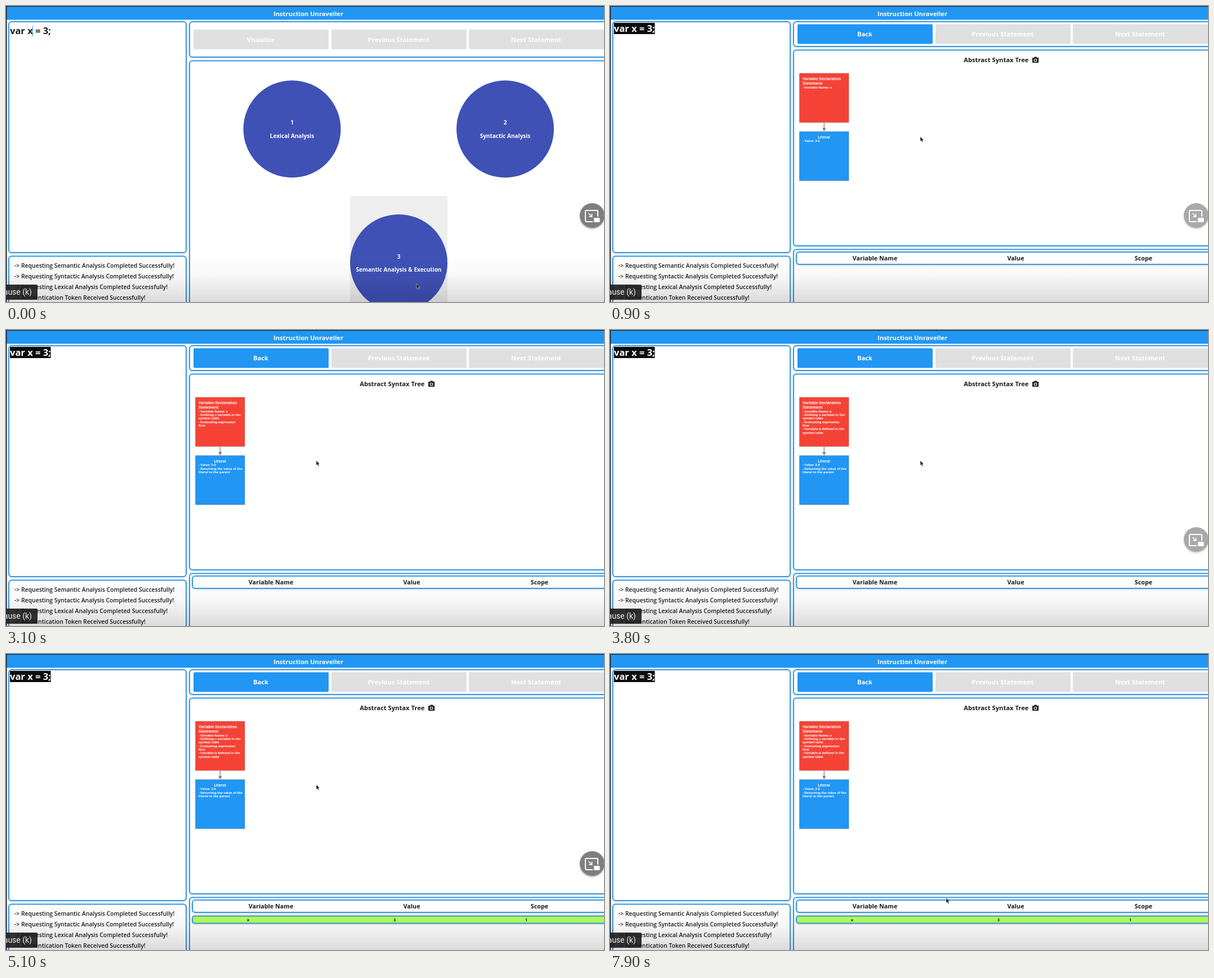
An HTML page that plays this animation: 1062 by 527 pixels, repeating every 8 s.

```html
<!DOCTYPE html>
<html lang="en">
<head>
<meta charset="utf-8">
<title>Instruction Unraveller</title>
<style>
  html, body { margin: 0; width: 100%; height: 100%; overflow: hidden; background: #fff; }
  svg { display: block; width: 100%; height: 100%; font-family: "Open Sans", "Noto Sans", sans-serif; }
  text { white-space: pre; }
  .b { font-weight: 700; }
  .s { font-weight: 600; }
</style>
</head>
<body>
<svg id="stage" viewBox="0 0 1062 527">
  <defs>
    <linearGradient id="dim" x1="0" y1="0" x2="0" y2="1">
      <stop offset="0" stop-color="#000" stop-opacity="0"/>
      <stop offset=".45" stop-color="#000" stop-opacity=".025"/>
      <stop offset="1" stop-color="#000" stop-opacity=".14"/>
    </linearGradient>
    <filter id="soft" x="-30%" y="-30%" width="160%" height="160%">
      <feGaussianBlur stdDeviation="1.6"/>
    </filter>
  </defs>
</svg>
<script>
const LOOP = 8000, STEP = 100;
const BLUE = '#2196f3', EDGE = '#3298e4', INK = '#1c1c1c';
const stage = document.getElementById('stage');

function el(parent, tag, attrs, content) {
  const node = document.createElementNS('http://www.w3.org/2000/svg', tag);
  for (const k in attrs) node.setAttribute(k, attrs[k]);
  if (content !== undefined) node.textContent = content;
  parent.appendChild(node);
  return node;
}
const group = (parent = stage) => el(parent, 'g', {});
const rect = (p, x, y, w, h, fill, more) => el(p, 'rect', { x, y, width: w, height: h, fill, ...more });
const path = (p, d, more) => el(p, 'path', { d, ...more });
const label = (p, x, y, str, size, fill = INK, anchor = 'middle', cls = 'b') =>
  el(p, 'text', { x, y, 'font-size': size, fill, 'text-anchor': anchor, class: cls }, str);

function panel(p, x, y, x2, y2, fill = '#fff', rx = 5) {
  const box = { rx, 'stroke-width': 2 };
  rect(p, x, y + 1, x2 - x, y2 - y, 'none', { ...box, stroke: '#000', opacity: .18, filter: 'url(#soft)' });
  rect(p, x, y, x2 - x, y2 - y, fill, { ...box, stroke: EDGE });
}

function toolbar(p, y, first, fill) {
  [[333, first], [578, 'Previous Statement'], [822, 'Next Statement']].forEach(([x, str], i) => {
    rect(p, x, y, 240, 35, i ? '#e0e0e0' : fill, { rx: 2 });
    label(p, x + 119.5, y + 21.5, str, 11.2, '#fff');
  });
}

function notes(p, y, lines) {
  lines.forEach((str, i) => label(p, 342, y + i * 6.35, str, 5.7, '#fff', 'start'));
}

// Shared frame
rect(stage, 0, 0, 1062, 527, '#fff');
rect(stage, 0, 0, 1062, 24.5, BLUE);
rect(stage, 0, 0, 1062, 1.2, '#15263a');
rect(stage, 0, 0, 1.5, 527, '#20262c');
label(stage, 537, 17.5, 'Instruction Unraveller', 11.2, '#fff');
panel(stage, 5, 28, 320, 439);
panel(stage, 5, 445.5, 320, 540);
['Requesting Semantic Analysis Completed', 'Requesting Syntactic Analysis Completed',
 'Requesting Lexical Analysis Completed', 'Authentication Token Received']
  .forEach((str, i) => label(stage, 15, 466 + i * 19, `-> ${str} Successfully!`, 10.4, INK, 'start', 's'));

// Menu view
const menu = group();
label(menu, 7, 50, 'var x = 3;', 16.5, INK, 'start');
rect(menu, 47, 35, 1, 19, '#3298e4');
panel(menu, 326, 28, 1075, 91);
toolbar(menu, 42, 'Visualize', '#e0e0e0');
panel(menu, 326, 97.5, 1075, 540);
rect(menu, 611, 338, 173, 189, '#eee');
[[508, 219, 'Lexical Analysis'], [886.5, 219, 'Syntactic Analysis'], [697.5, 457.5, 'Semantic Analysis & Execution']]
  .forEach(([cx, cy, str], i) => {
    el(menu, 'circle', { cx, cy, r: 86.5, fill: '#3f51b5' });
    label(menu, cx, cy - 8, i + 1, 10, '#fff');
    label(menu, cx, cy + 15.5, str, 10, '#fff');
  });

// Tree view
const tree = group();
rect(tree, 7, 30, 72.5, 20, '#0c0c0c');
label(tree, 7, 46, 'var x = 3;', 16.5, '#fff', 'start');
panel(tree, 326, 28, 1075, 72);
toolbar(tree, 32.5, 'Back', BLUE);
panel(tree, 326, 78.5, 1075, 427);
label(tree, 685.8, 100, 'Abstract Syntax Tree', 11.2);
path(tree, 'M750 93q0-1 1-1h2l1-1.5h3.5l1 1.5h1.7q1 0 1 1v7q0 1-1 1h-9.2q-1 0-1-1z', { fill: INK });
el(tree, 'circle', { cx: 755.6, cy: 96.5, r: 2.3, fill: INK, stroke: '#fff', 'stroke-width': 1.1 });

const card = { stroke: '#777', 'stroke-width': .7, 'stroke-opacity': .5 };
rect(tree, 336.3, 119.8, 87.8, 87.6, '#f44336', card);
rect(tree, 336.3, 223.5, 87.8, 87.6, BLUE, card);
path(tree, 'M380.3 208v13', { stroke: '#888', 'stroke-width': 1.4 });
path(tree, 'M376.8 216.5l3.5 6.5 3.5-6.5-3.5 1.6z', { fill: '#777' });
label(tree, 342, 131.5, 'Variable Declaration', 6.7, '#fff', 'start');
label(tree, 342, 139.7, 'Statement', 6.7, '#fff', 'start');
label(tree, 380, 235.5, 'Literal', 6.7, '#fff');
notes(tree, 146.6, ['- Variable Name: x']);
notes(tree, 242.4, ['- Value: 3.0']);

// Notes that turn up one after another
const steps = [
  [1000, 152.95, ['- Defining a variable in the', 'symbol table']],
  [2000, 165.65, ['- Evaluating expression', 'first']],
  [3100, 248.75, ['- Returning the value of the', 'literal to the parent']],
  [3300, 178.35, ['- Variable is defined in the', 'symbol table']]
].map(([at, y, lines]) => {
  const g = group(tree);
  notes(g, y, lines);
  return { at, g };
});

panel(tree, 326, 433.5, 1075, 540);
panel(tree, 331, 438, 1075, 460);
[[470.5, 'Variable Name'], [720.5, 'Value'], [947.5, 'Scope']]
  .forEach(([x, str]) => label(tree, x, 453, str, 10.8));
const row = group(tree);
panel(row, 331, 466.5, 1075, 479.5, '#b2ff59', 4);
[[430, 'x'], [690, '3'], [924, '1']].forEach(([x, str]) => label(row, x, 475.6, str, 7));

// Player overlay
rect(stage, 0, 440, 1062, 87, 'url(#dim)');
rect(stage, -6, 496, 62, 27, '#1c1c1c', { rx: 2, opacity: .9 });
el(stage, 'text', { x: 46, y: 514.3, 'font-size': 14, fill: '#eee', 'text-anchor': 'end',
  'font-family': 'Roboto, sans-serif' }, 'Pause (k)');

const pip = group();
el(pip, 'circle', { cx: 1041, cy: 375, r: 22, fill: '#000', opacity: .3, filter: 'url(#soft)' });
el(pip, 'circle', { cx: 1041, cy: 373, r: 22, fill: '#7f7f7f' });
rect(pip, 1029, 364, 22, 20, 'none', { rx: 2, stroke: '#fff', 'stroke-width': 2 });
rect(pip, 1042, 375, 14, 11, '#7f7f7f');
rect(pip, 1044, 377, 10.5, 8, '#fff', { rx: 1.5 });
path(pip, 'M1034.5 369l6 6m0-5v5.2h-5', { fill: 'none', stroke: '#fff', 'stroke-width': 1.7 });

const cursor = group();
path(cursor, 'M0 0v8.6l2-1.7 1.5 3.3 1.5-.7-1.5-3.2h2.7z',
  { fill: '#181818', stroke: '#fff', 'stroke-width': .6, 'stroke-opacity': .8 });

const ramp = (t, a, b) => Math.min(1, Math.max(0, (t - a) / (b - a)));
const ease = k => k * k * (3 - 2 * k);
const mix = (a, b, k) => a + (b - a) * k;
const show = (node, on) => node.setAttribute('visibility', on ? 'inherit' : 'hidden');

function draw(ms) {
  const t = Math.floor((ms % LOOP) / STEP) * STEP;
  show(menu, t < 100);
  show(tree, t >= 100);
  steps.forEach(s => show(s.g, t >= s.at));
  row.setAttribute('opacity', ramp(t, 3800, 4100));
  const seen = t < 3000 ? 1 - ramp(t, 800, 1100) : ramp(t, 3600, 3900) - ramp(t, 5600, 5800);
  pip.setAttribute('opacity', seen);
  const a = ease(ramp(t, 200, 600)), b = ease(ramp(t, 7500, 7900));
  const x = mix(mix(729, 551, a), 597, b), y = mix(mix(494.5, 232.5, a), 434.5, b);
  cursor.setAttribute('transform', `translate(${x} ${y})`);
}

const start = performance.now();
function tick() {
  draw(performance.now() - start);
  requestAnimationFrame(tick);
}
draw(0);
requestAnimationFrame(tick);
</script>
</body>
</html>
```
